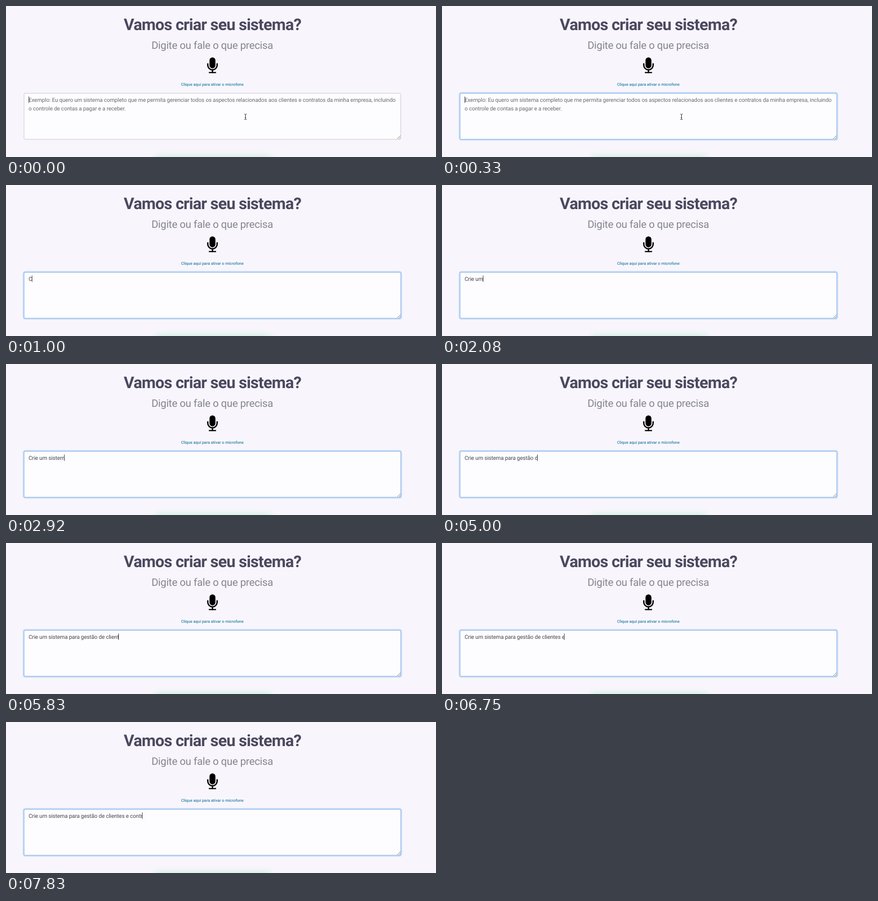
These frames come from a looping animation (800x282 px, 8 s). An HTML page:

```html
<!DOCTYPE html>
<html lang="pt-BR">
<head>
<meta charset="utf-8">
<title>Vamos criar seu sistema?</title>
<style>
  html, body { margin: 0; width: 100%; height: 100%; overflow: hidden; background: #f8f6fc; }
  svg { display: block; width: 800px; height: 282px; }
  text { font-family: Roboto, "Open Sans", sans-serif; white-space: pre; text-rendering: geometricPrecision; }
  .title { font-size: 30px; font-weight: 700; letter-spacing: -.75px; fill: #4b485f; }
  .sub { font-size: 19.3px; letter-spacing: -.23px; fill: #85848f; }
  .link { font-size: 7.45px; font-weight: 500; fill: #2b82a6; }
  .field { font-size: 10.3px; letter-spacing: -.123px; }
  #hint { fill: #6a6a74; }
  #typed { fill: #46464f; }
</style>
</head>
<body>
<svg viewBox="0 0 800 282">
  <defs>
    <filter id="blur" x="-20%" y="-100%" width="140%" height="300%"><feGaussianBlur stdDeviation="7"/></filter>
  </defs>
  <rect width="800" height="282" fill="#f8f6fc"/>
  <rect x="278" y="282" width="214" height="34" fill="#9fe5c0" opacity=".6" filter="url(#blur)"/>

  <text class="title" x="219.1" y="45">Vamos criar seu sistema?</text>
  <text class="sub" x="270.7" y="79.8">Digite ou fale o que precisa</text>

  <g fill="none" stroke="#000" stroke-width="2.5">
    <rect x="378.6" y="96" width="11" height="20.4" rx="5.5" fill="#000" stroke="none"/>
    <path d="M375.4 108V110.5A8.7 8.7 0 0 0 392.8 110.5V108M384.1 119V124" stroke-linecap="round"/>
    <path d="M377.4 124.3H390.8" stroke-width="2.2"/>
  </g>
  <text class="link" x="325.7" y="149.2">Clique aqui para ativar o microfone</text>

  <rect x="33.5" y="163" width="701" height="86" rx="2.5" fill="#fdfcfe" stroke="#cbcbd0"/>
  <g id="ring" fill="none">
    <rect x="32.8" y="162.3" width="702.4" height="87.4" rx="3.2" stroke="#c3d9f5" stroke-width="3.2"/>
    <rect x="33.5" y="163" width="701" height="86" rx="2.5" stroke="#a0c2ec"/>
  </g>
  <path d="M728 248L734 242M731.5 248L734 245.5" stroke="#77777d" stroke-width=".9"/>

  <g id="hint" class="field">
    <text x="42" y="179">Exemplo: Eu quero um sistema completo que me permita gerenciar todos os aspectos relacionados aos clientes e contratos da minha empresa, incluindo</text>
    <text x="42" y="195">o controle de contas a pagar e a receber.</text>
  </g>
  <text id="typed" class="field" x="42" y="179"></text>
  <rect id="caret" y="169" width="1" height="12" fill="#4c4c54"/>
  <path id="beam" d="M443.3 201.8Q445.5 201.8 445.5 203.5Q445.5 201.8 447.7 201.8M445.5 203V211M443.3 212.2Q445.5 212.2 445.5 210.5Q445.5 212.2 447.7 212.2M444.3 208.5H446.7" fill="none" stroke="#333"/>
</svg>
<script>
  const LOOP = 8000, FOCUS = 80, FADE = 170;
  const phrase = "Crie um sistema para gestão de clientes e contra";
  // Typing pace: [ms, characters], steady in between
  const pace = [
    [0, 0], [830, 1], [1500, 4], [2080, 7], [2500, 11], [3830, 23], [4670, 29],
    [5170, 30], [5830, 37], [6330, 38], [6750, 41], [7500, 48], [7750, 47]
  ];
  const $ = id => document.getElementById(id);
  const hint = $("hint"), typed = $("typed"), caret = $("caret"), ring = $("ring"), beam = $("beam");
  const show = (el, on) => el.setAttribute("visibility", on ? "visible" : "hidden");

  function charsAt(t) {
    const i = pace.findIndex(([at]) => at > t);
    if (i < 0) return pace[pace.length - 1][1];
    const [t0, n0] = pace[i - 1], [t1, n1] = pace[i];
    const n = n0 + (n1 - n0) * (t - t0) / (t1 - t0);
    return n1 < n0 ? Math.ceil(n) : Math.floor(n + 1e-6);
  }

  function draw(t) {
    const n = charsAt(t);
    typed.textContent = phrase.slice(0, n);
    caret.setAttribute("x", n ? Math.round(41.1 + typed.getComputedTextLength()) : 42);
    ring.setAttribute("opacity", Math.min(1, Math.max(0, (t - FOCUS) / FADE)));
    show(hint, !n);
    show(beam, !n);
  }

  const start = performance.now();
  function tick() {
    draw((performance.now() - start) % LOOP);
    requestAnimationFrame(tick);
  }
  draw(0);
  requestAnimationFrame(tick);
</script>
</body>
</html>
```
